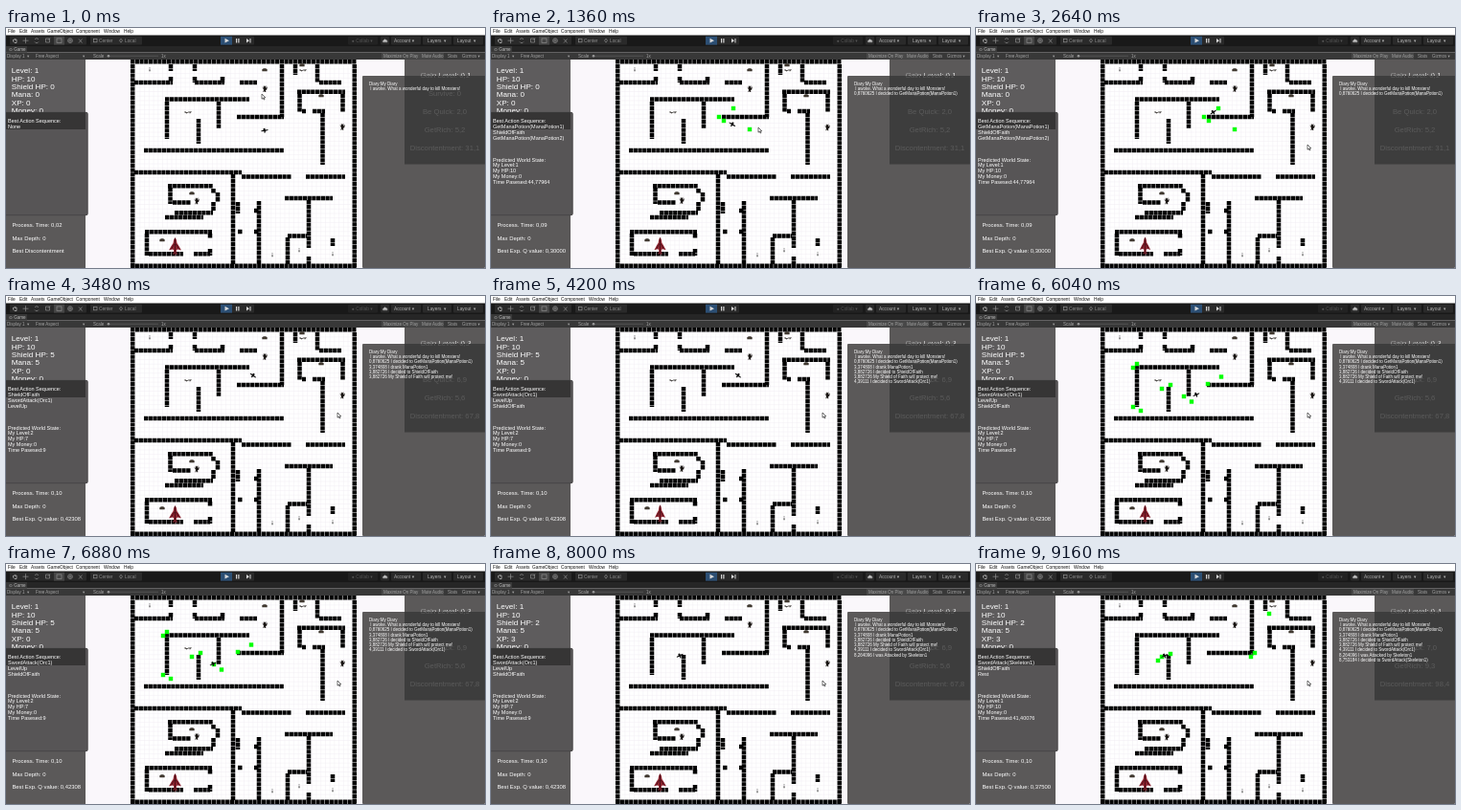
An HTML page for the animation above (9.2 s loop, 500 px wide and 251 px high).

```html
<!DOCTYPE html>
<html lang="en">
<head>
<meta charset="utf-8">
<style>
html, body { margin: 0; width: 100%; height: 100%; overflow: hidden; background: #fff; }
svg { display: block; width: 100vw; height: 100vh; font-family: "Liberation Sans", Arial, sans-serif; }
text { white-space: pre; }
</style>
</head>
<body>
<svg id="stage" viewBox="0 0 500 251" preserveAspectRatio="none">
  <defs>
    <pattern id="grid" x="130" y="33" width="4.72" height="4.72" patternUnits="userSpaceOnUse">
      <path d="M0 0H4.72M0 0V4.72" stroke="#ebe7ed" stroke-width=".7"/>
    </pattern>
    <g id="monster">
      <path d="M-3-2L-1.5 0L-1-3L0-1.5L1.2-3L1.5 0L3-2L2 2L1 1.5L1.3 4H.2L0 2.5L-.8 4H-1.6L-1 1.5Z" fill="#17120f"/>
    </g>
    <g id="chest">
      <path d="M-2.6 1.3V-.4Q-2-1.7 0-1.7T2.6-.4V1.3Z" fill="#29231c"/>
      <path d="M-1.8 0H1.8" stroke="#8c8170" stroke-width=".5"/>
    </g>
    <path id="orc" d="M-3 .8V-1M-3 .2L-1 .6L1-.2L3 .3V-1M-1.5 .4V1.4M2 .2V1.3" fill="none" stroke="#332f2c" stroke-width=".8"/>
    <path id="potion" d="M0-1.8V-1.1M0-.4V1.8M-.6 1.8H.7" stroke="#444" stroke-width=".8"/>
  </defs>

  <rect width="500" height="251" fill="#faf7fb"/>
  <rect x="130" y="33" width="236" height="218" fill="#fff"/>
  <rect x="130" y="33" width="236" height="218" fill="url(#grid)"/>
  <path id="walls" fill="none" stroke="#000" stroke-width="4.5" stroke-dasharray="4.22 .5"/>
  <g id="props"></g>
  <g id="nodes" fill="#0f0"></g>
  <g id="dragon">
    <path d="M0-9L1.4-6.5L2-3L4 0L6.5 4.5L3 3.5L1.5 4L1.3 7L3 9.5L.6 8L0 11L-.6 8L-3 9.5L-1.3 7L-1.5 4L-3 3.5L-6.5 4.5L-4 0L-2-3L-1.4-6.5Z" fill="#8f2430"/>
    <path d="M0-8V9M-.8-2L-4 3.2M.8-2L4 3.2" fill="none" stroke="#3d0b14" stroke-width=".8"/>
  </g>
  <g id="hero">
    <path d="M-3.4-1.8L-1-1L0-2.4L1.5-1.6L1 0L3.5 1.3L2.7 2L.4 1.2L-1.2 2.5L-2 2L-1 .5L-3.5-1Z" fill="#0c0c0c"/>
  </g>

  <rect y="33" width="83" height="73" fill="#5e5c5d"/>
  <rect y="196" width="83" height="55" fill="#5b5959"/>
  <g id="stats"></g>
  <path d="M0 88H84Q85.5 88 85.5 90V194Q85.5 196 84 196H0Z" fill="#575556"/>
  <rect y="88" width="83" height="18" fill="#363535"/>
  <path d="M0 88.3H84Q85.2 88.5 85.2 90V194Q85 195.7 84 195.7H0" fill="none" stroke="#3c3c3c" stroke-width=".6"/>
  <g id="plan"></g>
  <g id="debug"></g>

  <rect x="416" y="33" width="84" height="18" fill="#5b5959"/>
  <g id="goalTop"></g>
  <rect x="372" y="50" width="128" height="201" rx="1" fill="#5b5959"/>
  <rect x="416" y="50" width="84" height="92.5" fill="#3d3d3d"/>
  <g id="goals"></g>
  <g id="diary"></g>

  <g id="chrome">
    <rect width="500" height="8" fill="#fff"/>
    <rect y="7.5" width="500" height="11.5" fill="#191919"/>
    <rect y="19" width="500" height="6.5" fill="#262626"/>
    <rect y="19" width="22" height="6.5" fill="#383838"/>
    <rect y="25.5" width="500" height="7.5" fill="#383838"/>
    <g fill="#2a2a2a">
      <rect x="4" y="8.8" width="80" height="8.8" rx="1"/>
      <rect x="88" y="8.8" width="54" height="8.8" rx="1"/>
      <rect x="224" y="8.8" width="35" height="8.8" rx="1"/>
      <rect x="357" y="8.8" width="31" height="8.8" rx="1" fill="#222"/>
      <rect x="391" y="8.8" width="9" height="8.8" rx="1"/>
      <rect x="402" y="8.8" width="31" height="8.8" rx="1"/>
      <rect x="435" y="8.8" width="30" height="8.8" rx="1"/>
      <rect x="467" y="8.8" width="31" height="8.8" rx="1"/>
    </g>
    <rect x="50" y="8.8" width="11" height="8.8" fill="#454545"/>
    <rect x="224" y="8.8" width="12" height="8.8" fill="#2c4f74"/>
    <g fill="none" stroke="#8e8e8e" stroke-width=".7">
      <path d="M7.5 12V14L9 15.5H11V12M9 11V13M10 11V13" stroke="#c4c4c4"/>
      <path d="M17.5 13.2H23.5M20.5 10.2V16.2"/>
      <path d="M30 12A2.3 2.3 0 0 1 34 12M34 14.5A2.3 2.3 0 0 1 30 14.5"/>
      <path d="M41.5 11H45.5V15H41.5ZM43.5 13L46 10.5"/>
      <rect x="53" y="11" width="5" height="4.5"/>
      <circle cx="67" cy="13.2" r="2.4"/><path d="M67 11V15.4M64.8 13.2H69.2"/>
      <path d="M76 15.5L79.5 11.5M76 11.5L79.5 15.5"/>
      <rect x="91.5" y="11.3" width="3.5" height="3.5"/>
      <path d="M118.5 13.2L120 11.2L121.5 13.2L120 15.2Z"/>
      <path d="M393.5 14.8H398Q398.5 12.7 396.7 12.6Q395.5 10.8 394.3 12.7Q392.7 13.2 393.5 14.8Z" fill="#c4c4c4"/>
    </g>
    <path d="M228.5 10.8L233 13.2L228.5 15.6ZM240 11H241.2V15.5H240ZM242.3 11H243.5V15.5H242.3ZM251 11L254 13.2L251 15.5ZM254.5 11H255.5V15.5H254.5Z" fill="#d8d8d8"/>
    <path d="M106 29.3H159" stroke="#5c5c5c" stroke-width=".7"/>
    <circle cx="107" cy="29.3" r="1.3" fill="#999"/>
    <rect x="392" y="26" width="65" height="6.8" fill="#484848"/>
  </g>
  <path id="cursor" d="M0 0V5.2L1.3 4.1L2.2 6L3 5.6L2.2 3.8H3.8Z" fill="#fff" stroke="#111" stroke-width=".6"/>
</svg>

<script>
const LOOP = 9200;
const $ = id => document.getElementById(id);

function add(parent, tag, attrs, text) {
  const el = document.createElementNS("http://www.w3.org/2000/svg", tag);
  for (const k in attrs) el.setAttribute(k, attrs[k]);
  if (text !== undefined) el.textContent = text;
  parent.appendChild(el);
  return el;
}
const label = (parent, x, y, size, text, fill = "#fff", anchor = "start") =>
  add(parent, "text", { x, y, "font-size": size, fill, "text-anchor": anchor }, text);

// Maze
$("walls").setAttribute("d", [
  "M130 35.2H366", "M132.2 38V251", "M363.8 38V251", "M130 248.8H366",
  "M134 57H174", "M172 38V45", "M172 51V56", "M197 38V45", "M197 51V57", "M197 57H228", "M226 51V57",
  "M244 57H262", "M288 38V93", "M302 38V49", "M325 38V57", "M327 57H350",
  "M166 74.5H254", "M168 77V116", "M201 95V121", "M222 77V105", "M241 93H290",
  "M144 128H290", "M304 66.7H354", "M306.5 69V88", "M309 87H313", "M351.5 69V88", "M320 87H333", "M330.5 89V143",
  "M134 151H246", "M246 155.5H298", "M313 155.5H354", "M237 153V247",
  "M169 165.2H216", "M171.5 167V184", "M174 182.5H193", "M216.5 168V173", "M221 172V182", "M216.5 182V191",
  "M176 193.3H216", "M166 198H206",
  "M145 213.3H215", "M147 215V238", "M149 236.3H185", "M213 215V220", "M213 231V238", "M196 236.3H213",
  "M242 182V194", "M264 181V247", "M259 191H264", "M242 213H247", "M259 213H264",
  "M291 178H341", "M316 180V230", "M294 217.5H314", "M294 219V247", "M316 239V247", "M341 220V228"
].join(""));

const place = (ref, x, y) => add($("props"), "use", { href: "#" + ref, x, y });
[[270, 44], [309, 39], [329, 71], [194, 173], [163, 222]].forEach(p => place("chest", ...p));
[[150, 43], [278, 237], [306, 232], [341, 236]].forEach(p => place("potion", ...p));
place("orc", 310, 44);
const prey = place("orc", 190, 88);
const monsters = [[270, 63], [199, 180], [351, 103]].map(([x, y]) => place("monster", x, y));

// Editor chrome
[["File", 2], ["Edit", 14], ["Assets", 26], ["GameObject", 43], ["Component", 73], ["Window", 102], ["Help", 123]]
  .forEach(([s, x]) => label($("chrome"), x, 5.3, 4.8, s, "#111"));
[["Center", 97], ["Local", 124]].forEach(([s, x]) => label($("chrome"), x, 14.9, 4.8, s, "#8e8e8e"));
[["Account ▾", 405], ["Layers  ▾", 440], ["Layout  ▾", 471]]
  .forEach(([s, x]) => label($("chrome"), x, 14.9, 4.8, s, "#b4b4b4"));
label($("chrome"), 361, 14.9, 4.8, "● Collab ▾", "#555");
label($("chrome"), 3, 23.9, 4.6, "⊙ Game", "#bbb");
[["Display 1  ▾", 1], ["Free Aspect", 31], ["▾", 80], ["Scale", 91], ["1x", 162], ["Maximize On Play", 394],
  ["Mute Audio", 434], ["Stats", 461], ["Gizmos ▾", 476]]
  .forEach(([s, x]) => label($("chrome"), x, 30.9, 4.5, s, "#a2a2a2"));

// Text blocks, rewritten only when their content changes
function block(id, x, y, step, size, fill, anchor) {
  const rows = [];
  return lines => {
    for (let i = 0; i < Math.max(lines.length, rows.length); i++) {
      rows[i] = rows[i] || label($(id), x, y + i * step, size, "", fill, anchor);
      const s = lines[i] || "";
      if (rows[i].textContent !== s) rows[i].textContent = s;
    }
  };
}
const showStats = block("stats", 5.8, 47.2, 8.4, 8.1);
const showPlan = block("plan", 2, 99.3, 5.75, 5.5);
const showDebug = block("debug", 6.4, 208.2, 13.5, 5.9);
const showGoalTop = block("goalTop", 459, 51.8, 19, 7.9, "#e4e4e4", "middle");
const showGoals = block("goals", 458, 51.8, 19.1, 7.7, "#5b5b5b", "middle");
const showDiary = block("diary", 379, 59.8, 5.25, 4.5);

// Value of the latest entry [time, value] reached at t
const at = (t, steps) => steps.reduce((v, s) => t >= s[0] ? s[1] : v, steps[0][1]);

const CHOSEN = 460, DRANK = 2960, SHIELD = 3460, HUNT = 3970, ROUTE = 4380, KILL = 7640, HIT = 7850, NEXT = 8340, RETURN = 8750;

const plan = (actions, level, hp, time) => {
  const lines = ["Best Action Sequence:", ...actions];
  while (lines.length < 7) lines.push("");
  return [...lines, "Predicted World State:", "My Level:" + level, "My HP:" + hp, "My Money:0", "Time Pasesed:" + time];
};
const plans = [
  [0, ["Best Action Sequence:", "None"]],
  [CHOSEN, plan(["GetManaPotion(ManaPotion1)", "ShieldOfFaith", "GetManaPotion(ManaPotion2)"], 1, 10, "44,77964")],
  [SHIELD, plan(["ShieldOfFaith", "SwordAttack(Orc1)", "LevelUp"], 2, 7, "9")],
  [HUNT, plan(["SwordAttack(Orc1)", "LevelUp", "ShieldOfFaith"], 2, 7, "9")],
  [NEXT, plan(["SwordAttack(Skeleton1)", "ShieldOfFaith", "Rest"], 1, 10, "41,40076")]
];
const diary = [
  [0, "Diary:My Diary"],
  [0, " I awoke. What a wonderful day to kill Monsters!"],
  [CHOSEN, "0,8760625 I decided to GetManaPotion(ManaPotion1)"],
  [DRANK, "3,374808 I drank ManaPotion1"],
  [SHIELD, "3,882726 I decided to ShieldOfFaith"],
  [SHIELD, "3,882726 My Shield of Faith will protect me!"],
  [HUNT, "4,39111 I decided to SwordAttack(Orc1)"],
  [HIT, "8,264096 I was Attacked by Skeleton1"],
  [NEXT, "8,753184 I decided to SwordAttack(Skeleton1)"]
];
const goals = [
  [0, ["0,1", "0", "2,0", "5,2", "31,1"]],
  [SHIELD, ["0,3", "0", "6,9", "5,6", "67,8"]],
  [NEXT, ["0,4", "0", "7,0", "9,3", "98,4"]]
];
const goalNames = ["Gain Level: ", "Survive: ", "Be Quick: ", "GetRich: ", "Discontentment: "];

// Route markers, each group visible for a span of time
const routes = [
  [CHOSEN, DRANK, [[253, 84], [238, 93], [243, 97], [270, 106]]],
  [ROUTE, HIT, [[168, 71], [164, 75], [164, 116], [172, 120], [194, 97], [203, 93], [217, 105], [225, 110.5], [242, 92], [256, 84.5]]],
  [RETURN, LOOP, [[203, 94], [194, 97], [190, 101], [287, 97], [291, 93], [306, 52]]]
].map(([from, to, points]) => {
  const el = add($("nodes"), "g", {});
  points.forEach(([x, y]) => add(el, "rect", { x: x - 2.2, y: y - 2.2, width: 4.4, height: 4.4 }));
  return { from, to, el };
});

// A walk from a start time through points at constant speed (px per ms)
function walk(start, speed, points) {
  let t = start;
  return points.map(([x, y], i) => {
    if (i) t += Math.hypot(x - points[i - 1][0], y - points[i - 1][1]) / speed;
    return [t, x, y];
  });
}
// Linear position along [time, x, y] points
function along(t, pts) {
  for (let i = 1; i < pts.length; i++) {
    const [t0, x0, y0] = pts[i - 1], [t1, x1, y1] = pts[i];
    if (t < t1) {
      const k = Math.max(0, (t - t0) / (t1 - t0));
      return [x0 + (x1 - x0) * k, y0 + (y1 - y0) * k];
    }
  }
  return pts[pts.length - 1].slice(1);
}
const PACE = .0212;
const heroPath = [
  ...walk(CHOSEN, PACE, [[270, 107], [243, 97.5], [238, 93], [253, 85], [258, 83]]),
  ...walk(ROUTE, PACE, [[258, 83], [238, 93], [225, 109], [217, 105], [203, 93], [194, 97], [190, 101]]),
  ...walk(RETURN, PACE, [[190, 101], [194, 97], [203, 93]])
];
const cursorPath = [[0, 267, 69], [900, 279, 104], [1500, 279, 104], [2300, 346, 122]];

function draw(t) {
  showStats([
    "Level: 1", "HP: 10",
    "Shield HP: " + at(t, [[0, 0], [SHIELD, 5], [KILL, 2]]),
    "Mana: " + at(t, [[0, 0], [DRANK, 10], [SHIELD, 5]]),
    "XP: " + at(t, [[0, 0], [KILL, 3]]), "Money: 0"
  ]);
  showPlan(at(t, plans));
  showDebug([
    "Process. Time: " + at(t, [[0, "0,02"], [CHOSEN, "0,09"], [SHIELD, "0,10"]]),
    "Max Depth: 0",
    at(t, [[0, "Best Discontentment"], [CHOSEN, "Best Exp. Q value: 0,30000"],
      [SHIELD, "Best Exp. Q value: 0,42308"], [NEXT, "Best Exp. Q value: 0,37500"]])
  ]);
  const values = at(t, goals).map((v, i) => goalNames[i] + v);
  showGoalTop(values.slice(0, 1));
  showGoals(values);
  showDiary(diary.filter(d => t >= d[0]).map(d => d[1]));

  routes.forEach(r => r.el.setAttribute("visibility", t >= r.from && t < r.to ? "visible" : "hidden"));
  prey.setAttribute("visibility", t < KILL ? "visible" : "hidden");

  const [hx, hy] = along(t, heroPath);
  const turn = at(t, [[0, -35], [CHOSEN, 5], [2230, -60], [DRANK, 10], [ROUTE, -50]]);
  $("hero").setAttribute("transform", `translate(${hx} ${hy}) rotate(${turn})`);

  const beat = Math.cos(t / 1150 * 2 * Math.PI);
  $("dragon").setAttribute("transform", `translate(176.5 ${227.5 + beat * .4}) scale(${.9 + beat * .1} 1)`);
  monsters.forEach((el, i) => {
    const bob = Math.sin(t / 920 * 2 * Math.PI + i * 2);
    el.setAttribute("transform", `translate(0 ${bob * .35})`);
  });
  $("cursor").setAttribute("transform", `translate(${along(t, cursorPath)})`);
}

function tick(now) {
  draw(now % LOOP);
  requestAnimationFrame(tick);
}
draw(0);
requestAnimationFrame(tick);
</script>
</body>
</html>
```
